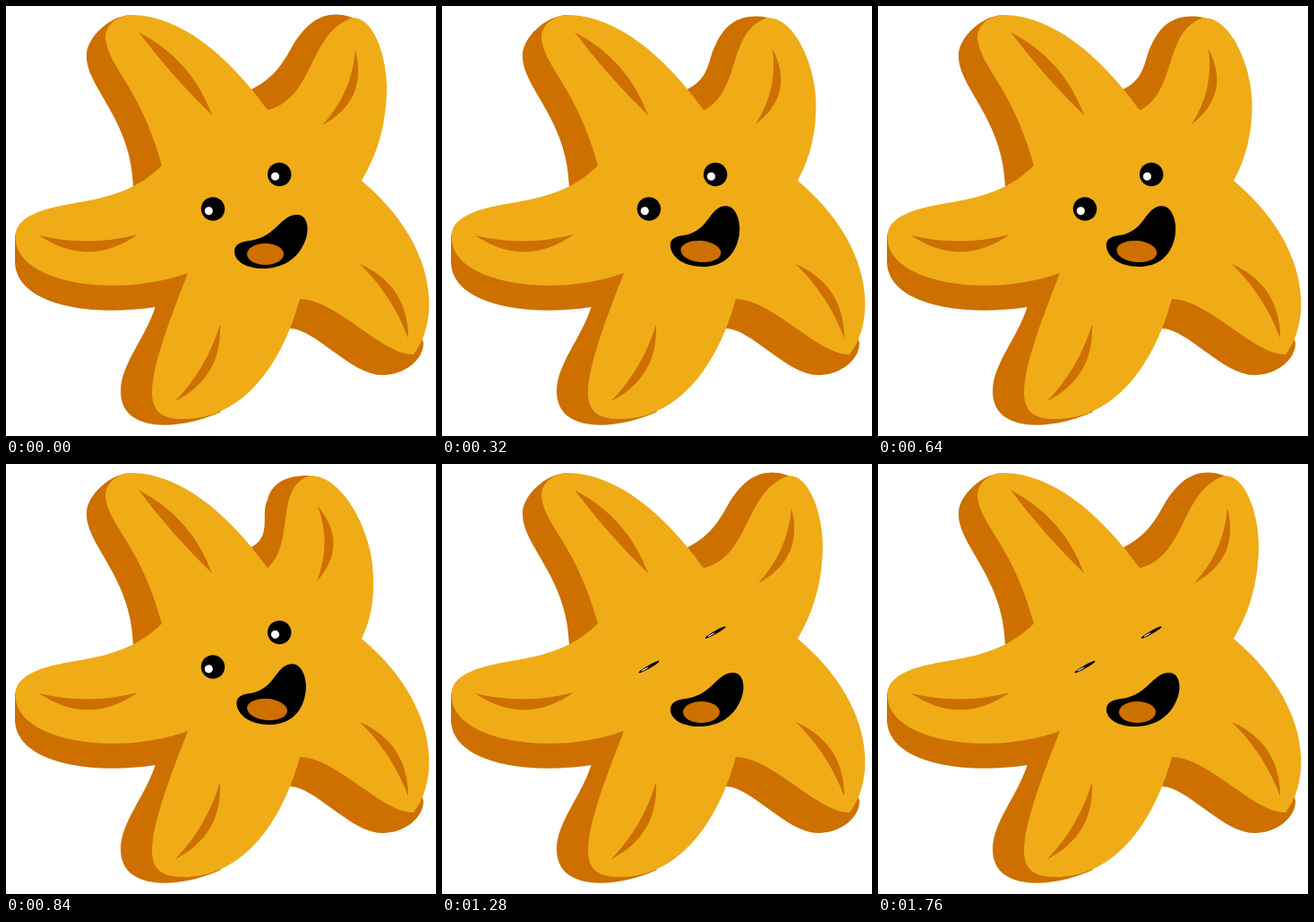
Animation of 480x480 px, one loop 1.92 s. Source, as an HTML page:

```html
<!DOCTYPE html>
<html lang="en">
<head>
<meta charset="utf-8">
<title>Waving starfish</title>
<style>
  html, body { margin: 0; width: 100%; height: 100%; overflow: hidden; background: #fff; }
  svg { display: block; width: 100%; height: 100%; }
  .side { fill: #cd7000; }
  .face { fill: #efac17; }
</style>
</head>
<body>
<svg viewBox="0 0 480 480">
  <defs>
    <g id="eye"><circle r="13.2"/><circle cx="-5.2" cy="-.4" r="4.6" fill="#fff"/></g>
  </defs>
  <path class="side" d="M143 10C118 8 90 35 90 54C88 90 140 125 142 202L190 204Z
    M10 255V285C10 332 90 348 167 336L203 298Z
    M167 335C155 372 128 400 128 430C128 480 200 472 240 453L203 298Z
    M317 360C345 360 385 412 420 412C445 412 466 395 466 376L440 300H328Z"/>
  <path class="side" id="armSide"/>
  <path class="face" d="M143 10C195 12 247 54 291 115L397 195C484 268 484 352 455 389
    C420 390 370 328 328 327C308 400 265 460 200 461C185 461 163 460 163 432
    C163 400 185 345 203 298C130 325 25 312 12 268C8 254 10 240 36 230
    C75 215 130 222 174 178C150 90 115 70 111 36C111 20 125 10 143 10Z"/>
  <path class="face" id="arm"/>
  <path class="side" id="creases"/>
  <use class="eye" href="#eye"/>
  <use class="eye" href="#eye"/>
  <path id="mouth" d="M255 274C255 266 262 263 272 262C302 258 306 233 325 233
    C337 233 339 250 334 262C326 283 308 293 287 293C268 293 255 285 255 274Z"/>
  <ellipse class="side" id="tongue" ry="12"/>
</svg>
<script>
const $ = id => document.getElementById(id);
const set = (el, attrs) => { for (const k in attrs) el.setAttribute(k, attrs[k]); };
const mix = (a, b, k) => a.map((v, i) => v + (b[i] - v) * k);
const curve = p => `M${p.slice(0, 2)}C${p.slice(2)}`;

// Arm outlines, swung in and swung out
const armSide = [
  [268,95, 300,85, 283,55, 292,40, 296,22, 312,12, 340,13],
  [274,93, 300,80, 310,62, 319,46, 337,15, 358,3, 387,13]];
const arm = [
  [290,118, 325,90, 298,25, 340,13, 378,13, 410,80, 410,125, 411,150, 408,172, 397,195],
  [293,116, 345,102, 337,30, 387,13, 412,13, 425,60, 425,90, 425,130, 415,165, 397,195]];
const armCrease = [[348,47, 347,131], [390,49, 353,133]];

// Two ends, then how far each edge bows sideways
const creases = [
  [148,29, 230,122, 12, -2.5],
  [37,256, 147,255, -7, -19],
  [239,355, 189,441, 16, 6],
  [395,288, 449,371, 16, 5.5]];

function leaf([x1, y1, x2, y2, a, b]) {
  const len = Math.hypot(x2 - x1, y2 - y1);
  const bow = d => [
    (x1 + x2) / 2 + (y2 - y1) / len * d * 2,
    (y1 + y2) / 2 - (x2 - x1) / len * d * 2];
  return `M${x1},${y1}Q${bow(a)},${x2},${y2}Q${bow(b)},${x1},${y1}Z`;
}

function draw(time) {
  const beat = time >= 800 && time < 960 ? 80 : 160;
  const t = Math.floor(time / beat) * beat;
  const waving = t >= 160 && t < 960;
  const swing = waving ? (1 - Math.cos((t - 160) / 320 * Math.PI)) / 2 : 1;
  const laugh = t < 160 ? 0 : Math.min(1, Math.max(0, (1280 - t) / 320));
  const shut = t === 1280 || t === 1760;

  set($('armSide'), { d: curve(mix(...armSide, swing)) + 'L300 130Z' });
  set($('arm'), { d: curve(mix(...arm, swing)) + 'L300 200Z' });
  const moving = [...mix(...armCrease, swing), 18, 8];
  set($('creases'), { d: [...creases, moving].map(leaf).join('') });

  const eyes = document.querySelectorAll('.eye');
  [[231, 226.5], [305.2, 188]].forEach((at, i) => set(eyes[i], {
    transform: `translate(${at}) rotate(-30) scale(1 ${shut ? .13 : 1})`
  }));

  // A laugh stretches the mouth up from its bottom edge and leans it left
  const dx = 3.5 * (1 - swing) ** 2;
  const lean = .2 * laugh, grow = .13 * laugh;
  set($('mouth'), {
    transform: `matrix(1 0 ${lean} ${1 + grow} ${dx - lean * 278} ${-2 * laugh - grow * 293})`
  });
  set($('tongue'), {
    rx: 20.5 + 2 * laugh,
    transform: `translate(${289.5 - 1.5 * laugh + dx} ${277 - 3 * laugh}) rotate(${5 * laugh})`
  });
}

function tick() {
  draw(performance.now() % 1920);
  requestAnimationFrame(tick);
}
tick();
</script>
</body>
</html>
```
